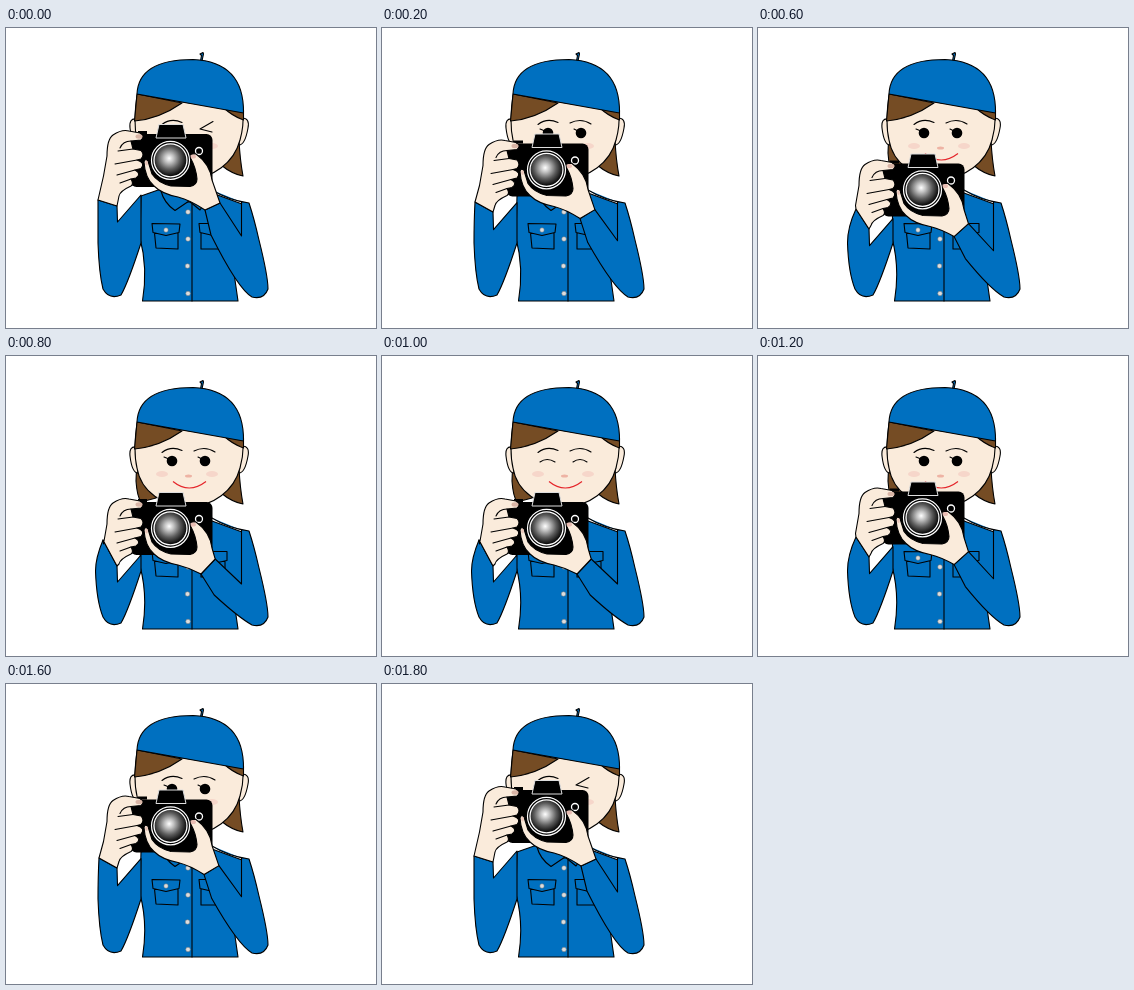
An HTML page for the animation above (2 s loop, 370 px wide and 300 px high).

```html
<!DOCTYPE html>
<html lang="en">
<head>
<meta charset="utf-8">
<title>Photographer</title>
<style>
html, body { margin: 0; width: 100%; height: 100%; overflow: hidden; background: #fff; }
svg { display: block; width: 370px; height: 300px; }
.ln { stroke: #000; stroke-width: 1.1; stroke-linejoin: round; stroke-linecap: round; fill: none; }
.blue { fill: #0070c0; }
.skin { fill: #faebdb; }
.hair { fill: #754c24; }
.pink { fill: #f6d6ca; }
</style>
</head>
<body>
<svg viewBox="0 0 370 300">
  <defs>
    <radialGradient id="glass" cx=".46" cy=".44" r=".56">
      <stop offset="0" stop-color="#fff"/>
      <stop offset=".25" stop-color="#c0c0c0"/>
      <stop offset=".6" stop-color="#5c5c5c"/>
      <stop offset="1" stop-color="#000"/>
    </radialGradient>
  </defs>
  <g id="head">
    <path class="ln hair" d="M131 100L130 125Q131 140 135 146L150 142V100Z"/>
    <path class="ln hair" d="M234 90L233 112Q234 132 237 148Q226 146 215 137L220 100Z"/>
    <path class="ln skin" d="M130 91Q123 90 124 100Q126 117 132 117Z"/>
    <path class="ln skin" d="M236 90Q244 90 242 100Q239 117 233 117Z"/>
    <path class="skin" d="M168 140H199V176L183 182L168 176Z"/>
    <path class="ln skin" d="M131 67Q127 95 131 112C135 136 158 151 183 151C207 150 228 135 234 112Q238 98 237 83Z"/>
    <path class="ln hair" d="M131 66L128.500 93Q153 91 176 75Z"/>
    <path class="ln hair" d="M217 79Q226 88 237.500 92V82Z"/>
    <path class="ln blue" d="M194.500 33L195.500 27.500L194 26L197 24.500L197.500 26L196 33Z"/>
    <path class="ln blue" d="M131 66C132 44 150 31.500 187 31.500C221 33 238 51 237.500 85L131 66Z"/>
    <ellipse class="pink" cx="156" cy="118" rx="6" ry="3"/>
    <ellipse class="pink" cx="206" cy="118" rx="6" ry="3"/>
    <ellipse cx="182.500" cy="120" rx="3.500" ry="1.500" fill="#eeb3a4"/>
    <path d="M167 125.500Q183 138.500 200 125.500" fill="none" stroke="#e5262b" stroke-width="1.200"/>
    <path class="ln" d="M156 96.500Q165 89.500 176 94.500"/>
  </g>
  <g id="eyes"></g>
  <g id="shirt">
    <path class="ln blue" d="M135 168L155 161L168 174H196L206 165L236 176V245H228L232 273H136.500Q142 240 134 210Z"/>
    <path class="ln blue" d="M155 163Q158 175 169 182.500L183 173L194 182L203 168"/>
    <path class="ln" d="M186 176V273"/>
    <path class="ln" d="M148.500 205L150 220L172 221V205M146 195.500L174 196L173 204.500L160 207.500L147 204.500ZM195 205V221H219V205M193 195.500H221V204.500L207 207.500L194 204.500Z"/>
    <g fill="#ddd" stroke="#777" stroke-width=".5">
      <circle cx="160" cy="202" r="2.200"/><circle cx="182" cy="184" r="2.300"/>
      <circle cx="182" cy="211" r="2.300"/><circle cx="181.500" cy="238" r="2.300"/>
      <circle cx="182" cy="265.500" r="2.300"/>
    </g>
  </g>
  <g id="arms"></g>
</svg>
<script>
const STEP = 200;
const order = [0, 1, 2, 3, 4, 5, 3, 2, 1, 0];

// drop: camera descent; cuff: outer left wrist; inner: inner wrist y; side: left edge of sleeve
const poses = [
  { eyes: 'wink', drop: 0, cuff: [92, 172], inner: 178, side: 92 },
  { eyes: 'open', drop: 9.5, cuff: [93, 174], inner: 184, side: 92 },
  { eyes: 'open', drop: 20, cuff: [95, 178], inner: 193, side: 91 },
  { eyes: 'open', drop: 29.5, cuff: [98, 181], inner: 201, side: 89.5 },
  { eyes: 'open', drop: 40, cuff: [97, 184], inner: 210, side: 89.5 },
  { eyes: 'smile', drop: 40, cuff: [97, 184], inner: 210, side: 89.5 }
];

const line = (d, cls = '') => `<path class="ln ${cls}" d="${d}"/>`;
const ring = (x, y, r, fill, stroke = 'none', w = 1) =>
  `<circle cx="${x}" cy="${y}" r="${r}" fill="${fill}" stroke="${stroke}" stroke-width="${w}"/>`;

const brow = line('M188 95Q199 89.500 209 96');
const faces = {
  wink: line('M207 93.500L194 101L206 104'),
  open: brow + ring(166, 105, 5.3, '#000') + ring(199, 105, 5.3, '#000') +
    line('M158 101L163 103M192 101L196 103'),
  smile: brow + line('M158 106Q165 101 173 106M191 106Q198 101 205 106')
};

function leftSleeve({ drop, cuff: [x, y], inner, side }) {
  const fold = 194 + drop * 0.8;
  return line(`M${x} ${y}Q${side} ${y + 18} ${side} 215Q${side + 1} 245 97 261Q103 272 115 267
    Q122 255 135 215V${fold - 27}L111.500 ${fold}L111 ${inner}Z`, 'blue');
}

// Both ends of the right cuff, in stage coordinates
const rightCuff = drop => ({
  top: [214 - drop * 0.12, 175 + drop * 0.7],
  low: [199 - drop * 0.1, 182 + drop * 0.9]
});

function rightSleeve(drop) {
  const { top, low } = rightCuff(drop);
  return line(`M206 162Q222 172 243 175Q248 190 253 212Q262 248 262 261Q258 272 246 269
    Q232 261 ${205 + drop * 0.08} ${207 + drop * 0.8}L${low}L${top}L235.500 ${208 + drop * 0.5}V174`, 'blue');
}

function cameraBody() {
  return `<rect x="124.500" y="106" width="82" height="53" rx="6"/>
    <path d="M132 106V103H141V106Z"/>
    <path d="M153 96.500H177L180 110H150Z" stroke="#ddd" stroke-width="1"/>` +
    ring(193, 123, 3.5, '#000', '#fff', 1.3);
}

function lens() {
  return ring(164.5, 132.3, 20.5, '#000') + ring(164.5, 132.3, 19, 'none', '#fff', 1.2) +
    ring(164.5, 132.3, 16.5, 'url(#glass)', '#fff', 1.3);
}

function rightHand(drop) {
  const { top, low } = rightCuff(drop);
  return line(`M138 134Q139 130 142 133L146 146Q152 155 165 158L184 158.500Q191 157 191 151
    Q190 140 185 131Q183 125 190 126Q204 136 206 152L${top[0]} ${top[1] - drop}
    L${low[0]} ${low[1] - drop}Q184 172 172 169Q156 166 148 158Q139 150 138 134Z`, 'skin') +
    '<ellipse cx="187" cy="128.500" rx="3" ry="2" fill="#e9bdb3"/>' +
    '<ellipse cx="140.500" cy="135" rx="1.300" ry="2.500" fill="#e9c4b8"/>';
}

function leftHand({ cuff: [x, y], inner, drop }) {
  return line(`M${x} ${y - drop}L97.500 148L101 128Q101 111 107 107Q116 101 123 103L134 105Q139 109 135 112L125 113
    L127 121L135 122.500Q139 127 135 131L131 132Q140 135 135 140.500L129 142Q136 146 130 150L125 151
    Q128 156 125 158Q114 163 113 168L111 ${inner - drop}Z`, 'skin') +
    line('M125 113Q117 113 114 120M127 121L112 123M131 132L109 136M129 142L111 147M125 151L114 155') +
    '<ellipse cx="133" cy="108.500" rx="3.500" ry="2.200" fill="#d9b5a6"/>';
}

const arms = p => leftSleeve(p) + rightSleeve(p.drop) +
  `<g transform="translate(0 ${p.drop})">` +
  cameraBody() + rightHand(p.drop) + lens() + leftHand(p) + '</g>';

const eyesEl = document.getElementById('eyes');
const armsEl = document.getElementById('arms');
let shown = -1;

function draw(now) {
  const pose = order[Math.floor(now / STEP) % order.length];
  if (pose !== shown) {
    shown = pose;
    eyesEl.innerHTML = faces[poses[pose].eyes];
    armsEl.innerHTML = arms(poses[pose]);
  }
}

const start = performance.now();
function tick() {
  draw(performance.now() - start);
  requestAnimationFrame(tick);
}
tick();
</script>
</body>
</html>
```
